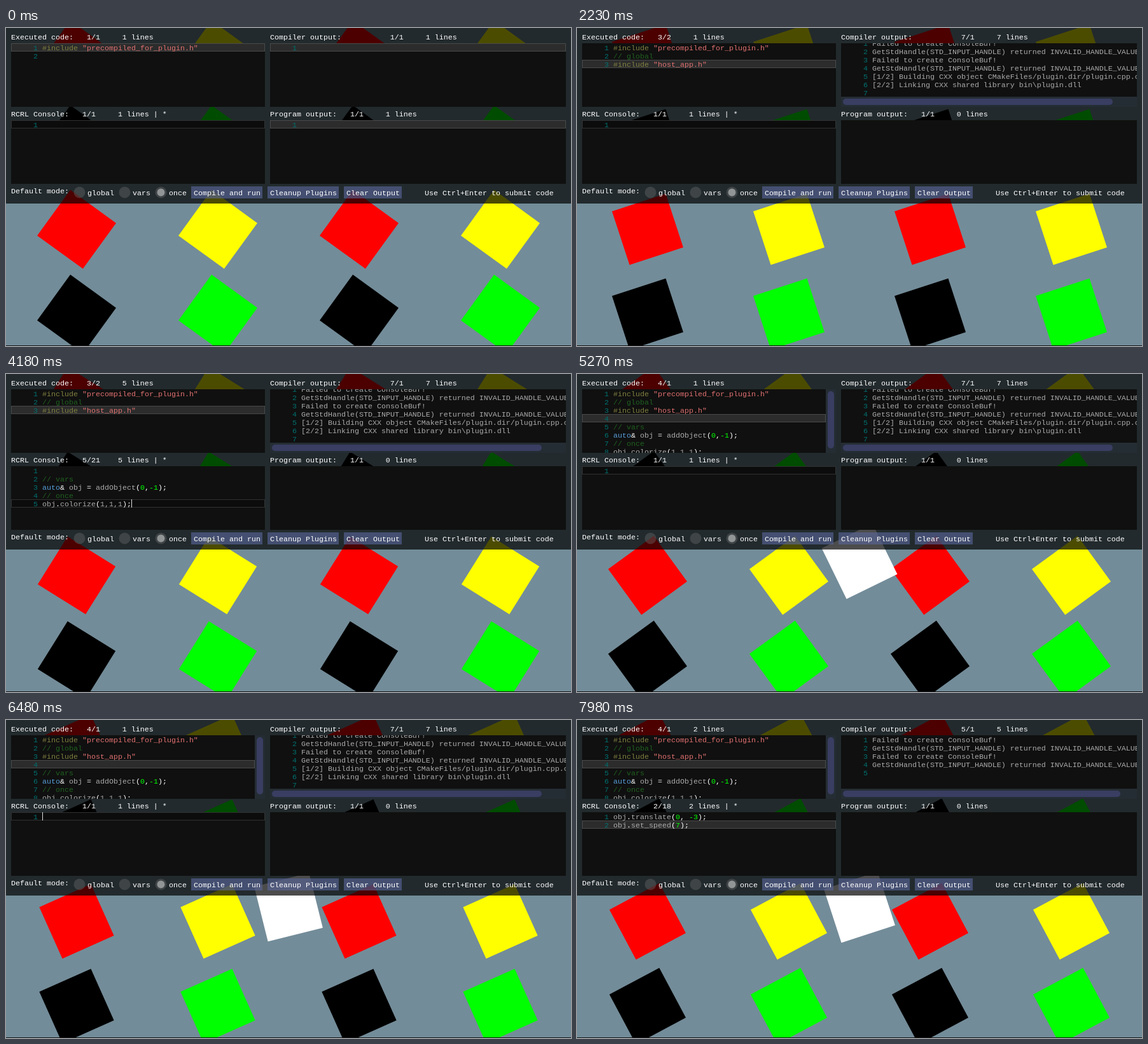
Write an HTML page with a canvas that moves like this. It is 888x500 px and loops after 8 s.

```html
<!DOCTYPE html>
<html lang="en">
<head>
<meta charset="utf-8">
<title>Live C++ console</title>
<style>
html, body { margin: 0; width: 100%; height: 100%; overflow: hidden; background: #738c99; }
canvas { display: block; }
</style>
</head>
<body>
<canvas id="stage" width="888" height="500"></canvas>
<script>
const ctx = document.getElementById('stage').getContext('2d');
const LOOP = 8000;
const CELL = 88.8;
const CHAR = 7;
const LINE = 13;
const FONT = '11.667px "Liberation Mono", monospace';

// [time in ms, degrees]
const spin = [[0, 81], [1050, 12], [2230, -63], [4180, -193], [5270, -261], [6480, -339], [7980, -433], [8000, -434]];

const startup = ['#include "precompiled_for_plugin.h"'];
const globals = ['// global', '#include "host_app.h"'];
const create = ['', '// vars', 'auto& obj = addObject(0,-1);', '// once', 'obj.colorize(1,1,1);'];
const move = ['obj.translate(0, -3);', 'obj.set_speed(7);'];
const failure = ['Failed to create ConsoleBuf!', 'GetStdHandle(STD_INPUT_HANDLE) returned INVALID_HANDLE_VALUE'];
const log = [...failure, ...failure,
  '[1/2] Building CXX object CMakeFiles/plugin.dir/plugin.cpp.obj',
  '[2/2] Linking CXX shared library bin\\plugin.dll'];

const before = { rows: [...startup, ''], line: 1, col: 1 };
const included = { rows: [...startup, ...globals], line: 3, col: 2 };
const created = { rows: [...included.rows, ...create], line: 4, col: 1, scroll: true };

// Each step changes only the listed parts of the state.
const steps = [
  [0, { executed: before, input: [''], busy: false, logged: 0, printed: 1, object: false }],
  [450, { input: globals }],
  [880, { busy: true, logged: 4 }],
  [1000, { logged: 5 }],
  [1500, { executed: included, input: [''], busy: false, logged: 6, printed: 0 }],
  [3700, { input: create }],
  [4270, { busy: true, logged: 4 }],
  [4450, { logged: 5 }],
  [4900, { executed: created, input: [''], busy: false, logged: 6, object: true }],
  [7050, { input: move }],
  [7800, { busy: true, logged: 4 }]
];

const syntax = [
  [/^\/\/.*/, '#206020'],
  [/^#\w+/, '#808040'],
  [/^"[^"]*"/, '#e07070'],
  [/^auto\b/, '#569cd6'],
  [/^\d(,\d)+/, '#aaaaaa'],
  [/^-?\d+/, '#00ff00'],
  [/^\w+/, '#aaaaaa'],
  [/^[^\w"#]/, '#ffffff']
];

function stateAt(time) {
  return Object.assign({}, ...steps.filter(([start]) => start <= time).map(step => step[1]));
}

function angleAt(time) {
  const i = spin.findIndex(([end]) => end > time);
  const [t0, a0] = spin[i - 1], [t1, a1] = spin[i];
  return a0 + (a1 - a0) * (time - t0) / (t1 - t0);
}

function box(x, y, w, h, color) {
  ctx.fillStyle = color;
  ctx.fillRect(x, y, w, h);
}

function text(string, x, baseline, color = '#fff') {
  ctx.fillStyle = color;
  ctx.fillText(string, x, baseline);
}

function disc(x, y, radius, color) {
  ctx.fillStyle = color;
  ctx.beginPath();
  ctx.arc(x, y, radius, 0, 2 * Math.PI);
  ctx.fill();
}

function square(x, y, degrees, color) {
  const radius = CELL / Math.SQRT2;
  ctx.fillStyle = color;
  ctx.beginPath();
  for (let i = 0; i < 4; i++) {
    const a = (degrees + i * 90) * Math.PI / 180;
    ctx.lineTo(x + radius * Math.cos(a), y + radius * Math.sin(a));
  }
  ctx.fill();
}

function code(string, x, baseline) {
  while (string) {
    const [pattern, color] = syntax.find(([p]) => p.test(string));
    const token = string.match(pattern)[0];
    text(token, x, baseline, color);
    x += token.length * CHAR;
    string = string.slice(token.length);
  }
}

function header(label, x, baseline, line, col, count, suffix = '') {
  const pad = n => String(n).padStart(3);
  text(`${label}${pad(line)}/${String(col).padEnd(3)} ${pad(count)} lines${suffix}`, x, baseline);
}

function thumb(x, y, w, h) {
  ctx.fillStyle = '#393e62';
  ctx.beginPath();
  ctx.roundRect(x, y, w, h, 5);
  ctx.fill();
}

// "current" is the highlighted line, "offset" the vertical scroll.
function editor({ x, y, w, h = 100, rows, gutter = 35, current = 0, focused, plain, offset = 0 }) {
  ctx.save();
  ctx.beginPath();
  ctx.rect(x, y, w, h);
  ctx.clip();
  box(x, y, w, h, '#101010');
  if (current) {
    const top = y + (current - 1) * LINE;
    box(x, top, w, LINE, focused ? 'rgba(0,0,0,.25)' : 'rgba(128,128,128,.25)');
    ctx.strokeStyle = 'rgba(160,160,160,.25)';
    ctx.strokeRect(x + .5, top + .5, w - 1, LINE - 1);
  }
  rows.forEach((row, i) => {
    const baseline = y + 11 + i * LINE - offset;
    text(i + 1, x + gutter, baseline, '#007070');
    if (plain) text(row, x + gutter + 14, baseline, '#aaaaaa');
    else code(row, x + gutter + 14, baseline);
  });
  ctx.restore();
}

function drawScene(time, object) {
  const angle = angleAt(time);
  const colors = [['#f00', '#ff0'], ['#000', '#0f0']];
  box(0, 0, 888, 500, '#738c99');
  for (let row = 0; row < 4; row++)
    for (let col = 0; col < 4; col++)
      square(111 + col * 2.5 * CELL, 50.2 + row * 1.5 * CELL, angle, colors[row % 2][col % 2]);
  if (object) square(444, 294.4, angle + 10, '#fff');
  box(0, 499, 888, 1, '#111');
  box(0, 0, 888, 276, 'rgba(0,0,0,.7)');
}

function drawExecuted({ executed, input }) {
  const { rows, line, col, scroll } = executed;
  header('Executed code: ', 8, 18, line, col, input.length);
  editor({ x: 8, y: 24, w: scroll ? 383 : 399, rows, current: line });
  if (scroll) {
    box(391, 24, 16, 100, '#252d34');
    thumb(394, 27, 10, 90);
  }
}

function drawCompiler({ logged }) {
  const count = logged + 1;
  header('Compiler output:'.padEnd(25), 415, 18, count, 1, count);
  editor({
    x: 415, y: 24, w: 465, h: logged ? 84 : 100, gutter: 35, plain: true,
    rows: [...log.slice(0, logged), ''], current: logged ? 0 : 1, offset: logged === 6 ? 7 : 0
  });
  if (logged) {
    box(415, 108, 465, 16, '#252d34');
    thumb(418, 111, logged === 4 ? 436 : 424, 10);
  }
}

function drawConsole({ input, busy }, time) {
  const line = input.length;
  const length = input[line - 1].length;
  header('RCRL Console: ', 8, 139, line, length + 1, line, ' | *');
  editor({ x: 8, y: 145, w: 399, rows: input, current: line, focused: !busy });
  const blinkOn = (time + 760) % 800 < 400;
  if (!busy && blinkOn) box(57 + length * CHAR, 145 + (line - 1) * LINE, 1, LINE, '#e0e0e0');
}

function drawProgram({ printed }) {
  header('Program output: ', 415, 139, 1, 1, printed);
  editor({ x: 415, y: 145, w: 465, rows: printed ? [''] : [], current: printed });
}

function drawToolbar() {
  text('Default mode:', 8, 260);
  [['global', 115.5], ['vars', 186.5], ['once', 243.5]].forEach(([label, x]) => {
    disc(x, 258.5, 9, 'rgba(110,110,110,.39)');
    if (label === 'once') disc(x, 258.5, 6, 'rgba(230,230,230,.5)');
    text(label, x + 12.5, 263);
  });
  [['Compile and run', 291, 112], ['Cleanup Plugins', 411, 112], ['Clear Output', 531, 91]].forEach(([label, x, w]) => {
    box(x, 249, w, 19, 'rgba(89,102,156,.62)');
    text(label, x + 4, 263);
  });
  text('Use Ctrl+Enter to submit code', 658, 263);
}

function draw() {
  const time = performance.now() % LOOP;
  const state = stateAt(time);
  ctx.font = FONT;
  drawScene(time, state.object);
  drawExecuted(state);
  drawCompiler(state);
  drawConsole(state, time);
  drawProgram(state);
  drawToolbar();
  requestAnimationFrame(draw);
}

draw();
</script>
</body>
</html>
```
